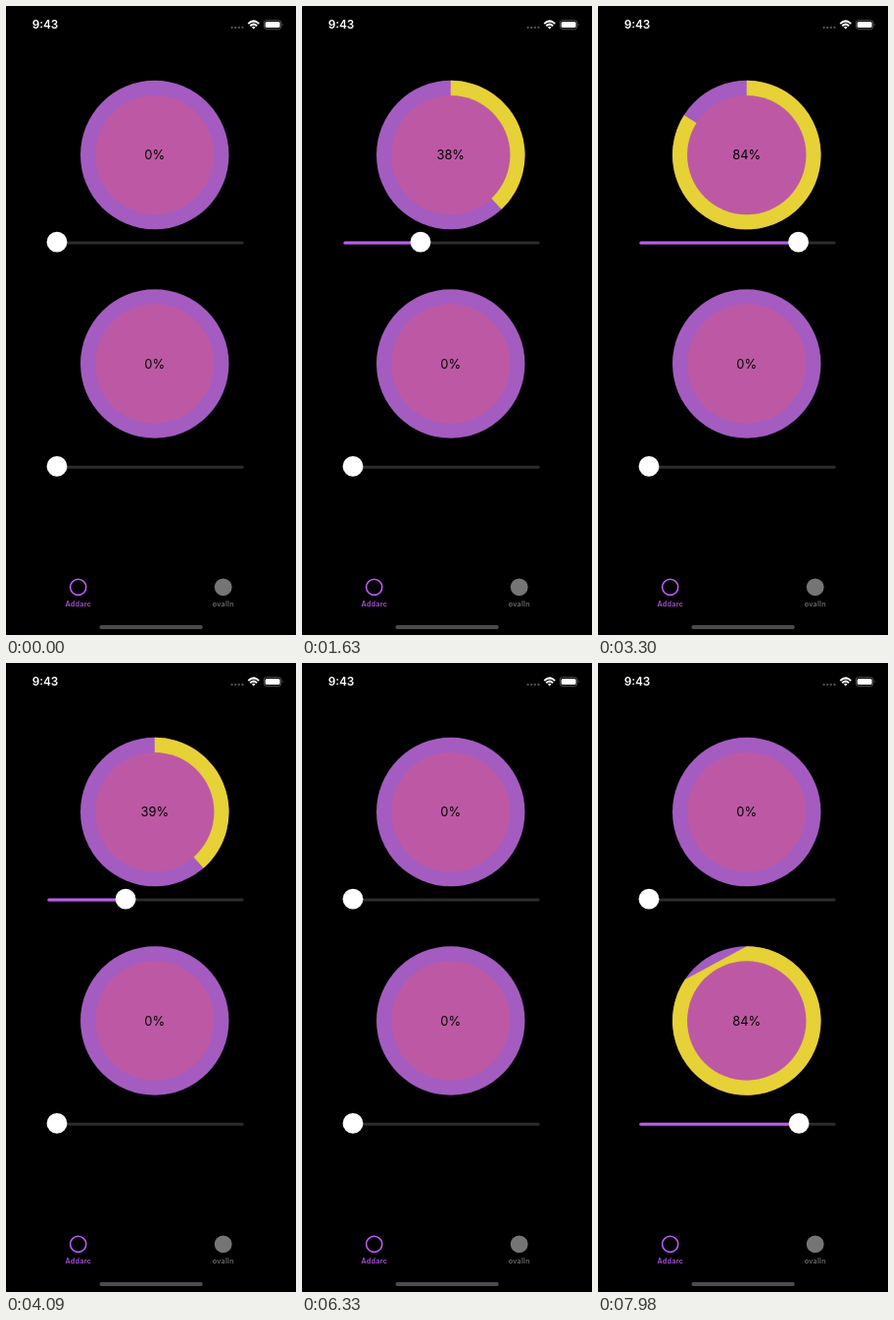
Animation, 296 px wide and 640 px high, one loop 8000 ms. Source, as an HTML page:

```html
<!DOCTYPE html>
<html lang="en">
<head>
<meta charset="utf-8">
<title>Progress rings</title>
<style>
  html, body { margin: 0; width: 100%; height: 100%; overflow: hidden; background: #000; }
  svg { display: block; width: 100vw; height: 100vh; }
  text { font-family: Inter, Roboto, sans-serif; }
  .percent { font-size: 12.9px; text-anchor: middle; fill: #000; }
  .tab { font-size: 7.3px; font-weight: 500; text-anchor: middle; letter-spacing: .25px; }
</style>
</head>
<body>
<svg viewBox="0 0 296 640">
  <rect width="296" height="640" fill="#000"/>

  <text x="26.7" y="23.2" font-size="11.8" font-weight="600" fill="#fff">9:43</text>
  <path d="M230.6 21.9h11" fill="none" stroke="#555" stroke-width="2.3"
        stroke-linecap="round" stroke-dasharray="0 3.6"/>
  <g fill="none" stroke="#fff" stroke-width="2">
    <path d="M247.3 17.9Q252.7 12.9 258.1 17.9"/>
    <path d="M249.3 20.2Q252.7 17 256.1 20.2"/>
  </g>
  <path d="M250.9 21.5Q252.7 20 254.5 21.5L252.7 23.4Z" fill="#fff"/>
  <rect x="263.3" y="14.6" width="17.6" height="8.8" rx="2.6" fill="none" stroke="#666" stroke-width=".8"/>
  <rect x="264.6" y="15.9" width="15" height="6.2" rx="1.5" fill="#fff"/>
  <path d="M281.9 17.4Q283.2 19 281.9 20.6Z" fill="#666"/>

  <g id="rings"></g>

  <circle cx="73.7" cy="591.3" r="8.1" fill="none" stroke="#bf5af2" stroke-width="1.6"/>
  <circle cx="221.7" cy="591.3" r="8.9" fill="#757575"/>
  <text class="tab" x="73.8" y="610.8" fill="#bf5af2">Addarc</text>
  <text class="tab" x="221.8" y="610.8" fill="#757575">ovalIn</text>
  <rect x="95.4" y="630.1" width="105.4" height="3.9" rx="1.95" fill="#4c4c4c"/>
</svg>
<script>
const LOOP = 8000, STEP = 110;
const CX = 151.75, R = 75.75, INNER = 60.7;
const TRACK_X = 42.3, TRACK_END = 242.7, THUMB_MIN = 52, TRAVEL = 181.6;

// Key points of each drag: [ms, percent]
const topDrag = [[630, 0], [1630, 38], [2390, 85.3], [2840, 97.4], [3300, 84], [4090, 38.6], [4850, 0]];
const bottomDrag = [[6420, 0], [7190, 41.6], [7980, 84.3]];

// Speed at a key point; the drag starts and ends at rest
function slope(keys, i) {
  const a = keys[i - 1], b = keys[i + 1];
  return a && b ? (b[1] - a[1]) / (b[0] - a[0]) : 0;
}

// Smooth curve through the key points, held for about STEP ms at a time
function valueAt(keys, t) {
  const i = keys.findLastIndex(k => k[0] <= t);
  if (i < 0) return 0;
  if (i === keys.length - 1) return keys[i][1];
  const [t0, p0] = keys[i], [t1, p1] = keys[i + 1];
  const span = t1 - t0, n = Math.round(span / STEP);
  const u = Math.floor((t - t0) / span * n + 0.02) / n, v = 1 - u;
  return p0 * v * v * (1 + 2 * u) + p1 * u * u * (1 + 2 * v)
    + span * u * v * (slope(keys, i) * v - slope(keys, i + 1) * u);
}

function add(parent, tag, attrs) {
  const node = document.createElementNS("http://www.w3.org/2000/svg", tag);
  for (const key in attrs) node.setAttribute(key, attrs[key]);
  return parent.appendChild(node);
}

function makeRing(cy, sliderY, isSector, keys) {
  const g = add(document.getElementById("rings"), "g", {});
  add(g, "circle", { cx: CX, cy, r: R, fill: "#a45cc0" });
  const arc = add(g, "path", { fill: "#e6d136" });
  add(g, "circle", { cx: CX, cy, r: INNER, fill: "#bd59a4" });
  const label = add(g, "text", { class: "percent", x: CX, y: cy + 4.8 });
  const bar = { x: TRACK_X, y: sliderY - 0.6, height: 3, rx: 1.5 };
  add(g, "rect", { ...bar, width: TRACK_END - TRACK_X, fill: "#2c2c2d" });
  const fill = add(g, "rect", { ...bar, fill: "#bf5af2" });
  const thumb = add(g, "circle", { cy: sliderY, r: 10.4, fill: "#fff" });

  return t => {
    const p = valueAt(keys, t) / 100;
    const a = p * 2 * Math.PI;
    const x = CX + R * Math.sin(a), y = cy - R * Math.cos(a);
    const close = isSector ? `L${CX} ${cy}Z` : "Z";
    arc.setAttribute("d", p > 0
      ? `M${CX} ${cy - R}A${R} ${R} 0 ${p > 0.5 ? 1 : 0} 1 ${x} ${y}${close}` : "");
    label.textContent = Math.round(p * 100) + "%";
    const thumbX = THUMB_MIN + TRAVEL * p;
    thumb.setAttribute("cx", thumbX);
    fill.setAttribute("width", thumbX - TRACK_X);
  };
}

const rings = [
  makeRing(151.6, 240.2, true, topDrag),
  makeRing(364, 468.4, false, bottomDrag)
];

function draw(now) {
  const t = now % LOOP;
  rings.forEach(update => update(t));
  requestAnimationFrame(draw);
}
draw(performance.now());
</script>
</body>
</html>
```
